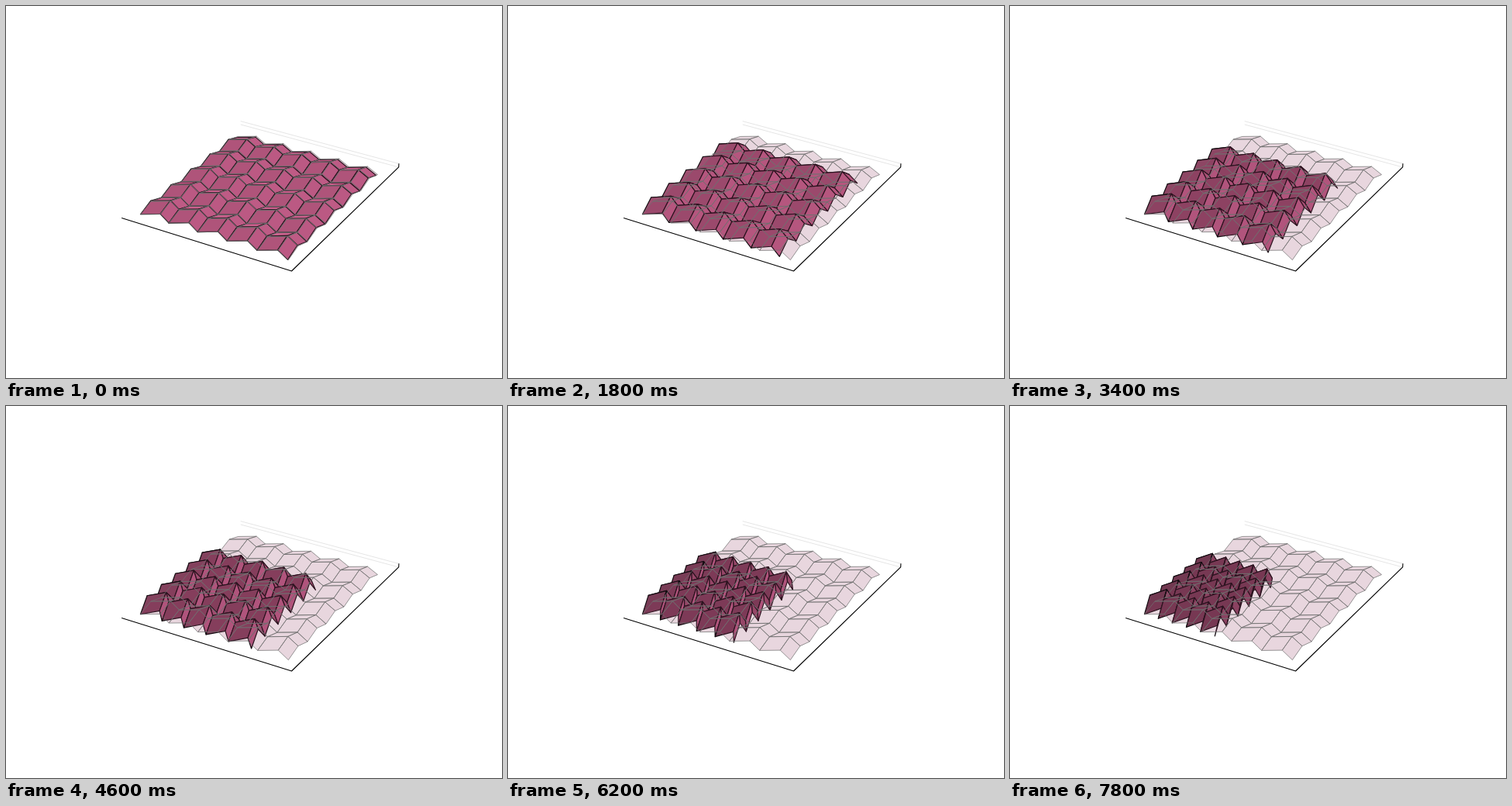
An HTML page with a canvas for the animation above (8000 ms loop, 640 by 480 pixels).

```html
<!DOCTYPE html>
<html lang="en">
<head>
<meta charset="utf-8">
<title>Folding sheet</title>
<style>
  html, body { margin: 0; width: 100%; height: 100%; overflow: hidden; background: #fff; }
  canvas { display: block; width: 640px; height: 480px; }
</style>
</head>
<body>
<canvas id="stage" width="640" height="480"></canvas>
<script>
const ctx = document.getElementById('stage').getContext('2d');
const LOOP = 8000, STEP = 200;
const CELLS = 10, SIDE = 0.125, GAMMA = Math.PI / 3;
const ORIGIN = [-0.534, -0.634, -0.014];
const BOX = [0.611, 0.731, 0.014];
const rad = deg => deg * Math.PI / 180;
const FLAT = rad(18), START = rad(20.5);
const SPEED = 0.474 * SIDE;

// Perspective camera: elevation 30, azimuth -60, distance 10
const RIGHT = [0.866, 0.5, 0];
const UP = [-0.25, 0.433, 0.866];
const TOWARD = [0.433, -0.75, 0.5];
const dot = (a, b) => a[0] * b[0] + a[1] * b[1] + a[2] * b[2];

function project(p) {
  const depth = 10 - dot(p, TOWARD);
  const k = 1998 / depth;
  return { x: 333 + k * dot(p, RIGHT), y: 237.4 - k * dot(p, UP), depth };
}

// Miura fold: x step, y step, zigzag and height from the fold angle
function miura(theta) {
  const c = Math.cos(theta) * Math.tan(GAMMA);
  const s = Math.sin(theta) * Math.sin(GAMMA);
  const zig = SIDE / Math.hypot(1, c);
  return { dx: zig * c, zig, dy: SIDE * Math.sqrt(1 - s * s), h: SIDE * s };
}

// RMS movement of the vertices per radian of folding
function travel(theta) {
  const e = 1e-4, a = miura(theta), b = miura(theta + e);
  const spread = Math.sqrt(CELLS * (2 * CELLS + 1) / 6);
  return Math.hypot(
    spread * (b.dx - a.dx), spread * (b.dy - a.dy), (b.h - a.h) * Math.SQRT1_2
  ) / e;
}

// The vertices move at a constant RMS speed
function foldAngle(ms) {
  let theta = START;
  for (let t = 0; t < ms; t += 20) theta += SPEED * 0.02 / travel(theta);
  return theta;
}

function facets(theta) {
  const { dx, dy, zig, h } = miura(theta);
  const vertex = (i, j) => project([
    ORIGIN[0] + i * dx,
    ORIGIN[1] + j * dy + (i % 2) * zig,
    ORIGIN[2] + (j % 2) * h
  ]);
  const list = [];
  for (let i = 0; i < CELLS; i++) {
    for (let j = 0; j < CELLS; j++) {
      const pts = [vertex(i, j), vertex(i + 1, j), vertex(i + 1, j + 1), vertex(i, j + 1)];
      const v = i % 2 ? -zig : zig, z = j % 2 ? -h : h;
      const n = [v * z, -dx * z, dx * dy];
      const len = Math.hypot(...n);
      list.push({
        pts,
        depth: pts.reduce((sum, p) => sum + p.depth, 0) / 4,
        tone: 148 + (-41 * n[0] + 31 * n[1] + 56 * n[2]) / len
      });
    }
  }
  return list.sort((a, b) => b.depth - a.depth);
}

function trace(pts, closed) {
  ctx.beginPath();
  pts.forEach(p => ctx.lineTo(p.x, p.y));
  if (closed) ctx.closePath();
}

function line(pts, color, width) {
  trace(pts, false);
  ctx.strokeStyle = color;
  ctx.lineWidth = width;
  ctx.stroke();
}

const corner = (x, y, z) => project([x * BOX[0], y * BOX[1], z * BOX[2]]);
const flat = facets(FLAT);

function drawAxes() {
  for (const z of [-1, 0.9]) line([corner(-1, 1, z), corner(1, 1, z)], '#e2e2e2', 0.9);
  line([corner(-1, -1, -1), corner(1, -1, -1), corner(1, 1, -1), corner(1, 1, 1)], '#000', 1.1);
}

function drawFolding(theta) {
  ctx.strokeStyle = '#140c11';
  ctx.lineWidth = 1.2;
  for (const f of facets(theta)) {
    trace(f.pts, true);
    ctx.fillStyle = `rgb(${f.tone}, ${f.tone * 0.5}, ${f.tone * 0.71})`;
    ctx.fill();
    ctx.stroke();
  }
}

// Translucent copy of the unfolded sheet, above the moving one
function drawFlat() {
  ctx.beginPath();
  for (const { pts } of flat) {
    pts.forEach((p, k) => k ? ctx.lineTo(p.x, p.y) : ctx.moveTo(p.x, p.y));
    ctx.closePath();
  }
  ctx.fillStyle = 'rgba(140, 50, 90, 0.2)';
  ctx.fill();
  ctx.strokeStyle = 'rgba(112, 112, 112, 0.9)';
  ctx.lineWidth = 0.8;
  ctx.stroke();
}

function draw(ms) {
  ctx.fillStyle = '#fff';
  ctx.fillRect(0, 0, 640, 480);
  ctx.lineJoin = 'round';
  drawAxes();
  drawFolding(foldAngle(ms));
  drawFlat();
}

const start = performance.now();
function tick() {
  const t = (performance.now() - start) % LOOP;
  draw(Math.floor(t / STEP) * STEP);
  requestAnimationFrame(tick);
}
tick();
</script>
</body>
</html>
```
